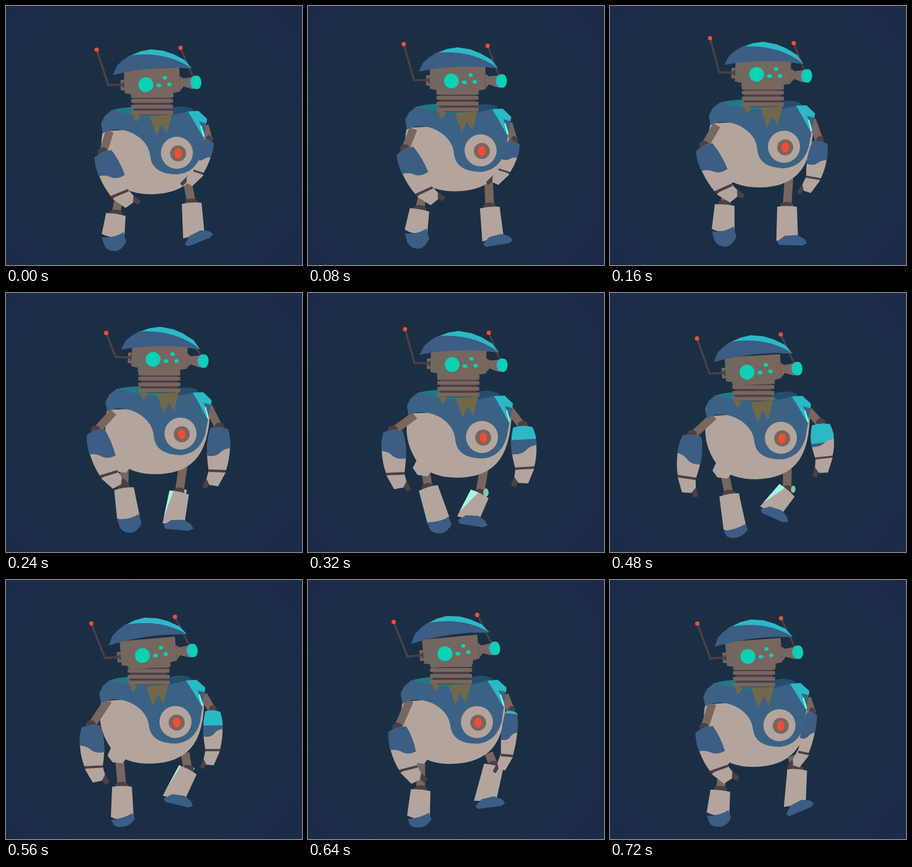
Write an HTML page with a canvas that moves like this. It is 480x420 px and loops after 0.8 s.

```html
<!DOCTYPE html>
<html lang="en">
<head>
<meta charset="utf-8">
<title>Walking robot</title>
<style>
html, body { margin: 0; width: 480px; height: 420px; overflow: hidden; background: #1b2e44; }
canvas { display: block; }
</style>
</head>
<body>
<canvas id="stage" width="480" height="420"></canvas>
<script>
const ctx = document.getElementById('stage').getContext('2d');
const STEPS = 10, STEP_MS = 80, DEG = Math.PI / 180;
const CREAM = '#b3a59d', BROWN = '#78665f', DARK = '#4b4045', BLUE = '#3c5d84', CHEST = '#3b6284';
const CYAN = '#2bb9c6', EYE = '#0ad2b5', RED = '#f04e33', OLIVE = '#71684c', MINT = '#a5f5e6';
let step = 0;

// One swing per cycle, peaking at a step
const swing = peak => Math.cos((step - peak) * 2 * Math.PI / STEPS);
const push = peak => Math.max(0, swing(peak));

// A swing plus an optional bounce that comes twice per cycle
const wave = (mid, amp, peak, bounce = 0, bouncePeak = 0) =>
  mid + amp * swing(peak) + bounce * Math.cos((step - bouncePeak) * 4 * Math.PI / STEPS);

function fill(color, path) {
  ctx.fillStyle = color;
  ctx.fill(new Path2D(path));
}

const poly = (color, ...points) => fill(color, 'M' + points.join(' ') + 'Z');

function oval(color, x, y, rx, ry = rx) {
  ctx.fillStyle = color;
  ctx.beginPath();
  ctx.ellipse(x, y, rx, ry, 0, 0, Math.PI * 2);
  ctx.fill();
}

function line(color, width, ...points) {
  ctx.strokeStyle = color;
  ctx.lineWidth = width;
  ctx.lineJoin = 'round';
  ctx.stroke(new Path2D('M' + points.join(' ')));
}

function box(color, x, y, w, h) {
  ctx.fillStyle = color;
  ctx.fillRect(x, y, w, h);
}

function placed(x, y, angle, draw) {
  ctx.save();
  ctx.translate(x, y);
  ctx.rotate(angle);
  draw();
  ctx.restore();
}

// Local space runs from 0 to 100 down the limb.
function limb(from, to, width, draw) {
  const dx = to.x - from.x, dy = to.y - from.y;
  placed(from.x, from.y, Math.atan2(dy, dx) - Math.PI / 2, () => {
    ctx.scale(width, Math.hypot(dx, dy) / 100);
    draw();
  });
}

function drawBackground() {
  const glow = ctx.createRadialGradient(225, 205, 40, 225, 205, 320);
  glow.addColorStop(0, '#1b3043');
  glow.addColorStop(.5, '#1b2e45');
  glow.addColorStop(1, '#1c2a4b');
  box(glow, 0, 0, 480, 420);
}

function drawThigh(hipX, hipY, knee) {
  line(BROWN, 14, hipX, hipY, knee.x, knee.y);
  oval(DARK, knee.x, knee.y - 1, 11, 7);
}

function drawLeftLeg(body) {
  const knee = { x: wave(187, 9, 4.7), y: wave(329, 13, 8.7) };
  const ankle = { x: wave(189.5, 20, 4.7, 4, 4.5), y: wave(373.5, 11, 7.3) };
  const toe = { x: ankle.x + 4, y: ankle.y + wave(20, 6, 1.5) };
  drawThigh(186 + body.x, 296 + body.y, knee);
  limb(knee, ankle, 1, () => fill(CREAM, 'M-16 0Q0-5 16 0L19 100Q0 118-18 100Z'));
  limb(ankle, toe, 1, () => fill(BLUE, 'M-18 0Q4 20 18-10L20 55Q12 105 2 108Q-12 104-16 60Z'));
}

function drawRightLeg(body) {
  const knee = { x: wave(291, 12.5, 9), y: wave(318.6, 11, 3, 6, .5) };
  const ankle = { x: wave(279, 25, 0), y: wave(365.4, 12, 1.6) };
  const rim = push(4.8);
  drawThigh((288 + body.x + knee.x) / 2, 288 + body.y, knee);
  oval('#7accaa', knee.x + 10, knee.y - 2, 5 * rim, 8 * rim);
  limb(knee, ankle, 1, () => {
    fill(CREAM, 'M-16 0Q0-5 16 0L18 94-17 108Z');
    poly(MINT, -16, 0, -16 + 15 * rim, -2, -17, 90);
  });
  placed(ankle.x + 8, ankle.y + 5, wave(1, 20, 5, 8, 1.5) * DEG, () =>
    poly(BLUE, -24, 1, -12, -9, 8, -11, 20, -5, 25, 2, 18, 6, -20, 6));
}

// Hands follow the forearm and curl a little further inwards.
function drawArm(shoulderX, shoulderY, elbow, wrist, side, width = 1, lit = 0) {
  const lean = Math.atan2(wrist.x - elbow.x, wrist.y - elbow.y);
  const curl = 1.3 * lean + side * 15 * DEG;
  const tip = { x: wrist.x + 27 * Math.sin(curl), y: wrist.y + 27 * Math.cos(curl) };
  line(BROWN, 13, shoulderX, shoulderY, elbow.x, elbow.y);
  oval(DARK, elbow.x, elbow.y - 3, 8 * width, 7);
  limb(wrist, tip, side * Math.max(width, .7), () => {
    poly(DARK, 4, 60, 14, 55, 17, 125, 9, 130);
    poly(CREAM, -14, 0, 15, 0, 14, 70, 6, 100, -9, 92);
  });
  limb(elbow, wrist, side * width, () => {
    fill(CREAM, 'M-15 2Q0-6 15 0Q24 40 16 100L-14 100Q-24 50-15 2Z');
    box(DARK, -14, 99, 30, 6);
    const sleeve = 'M-15 2Q0-6 15 0Q21 30 20 66Q4 70-4 56Q-10 48-20 46Q-20 20-15 2Z';
    fill(BLUE, sleeve);
    ctx.clip(new Path2D(sleeve));
    if (lit) box(CYAN, -25, -10, 50, 10 + 58 * lit);
  });
}

function drawArms(body) {
  drawArm(322 + body.x, 194 + body.y,
    { x: wave(338, 10.5, 4.1), y: wave(217, 4.2, 1.6) },
    { x: wave(333.4, 21, 4.7), y: wave(275.6, 2, 3, 10, 3.2) },
    -1, wave(.8, .25, 4.5), push(5.6));
  drawArm(168 + body.x, 203 + body.y,
    { x: wave(145, 12.6, .5), y: wave(233, 9, 8.7) },
    { x: wave(158.3, 32.6, .6, 5.6, 2.7), y: wave(298.6, 7, 8.7) },
    1);
}

function drawBelly() {
  oval('#207985', 226, 171, 55, 8);
  oval('#254d6c', 284, 170, 20, 7);
  fill(CREAM, 'M157 203C150 235 158 262 177 286Q200 306 238 305Q280 304 301 281Q325 255 324 192Z');
  poly(CREAM, 172, 278, 166, 291, 174, 302, 190, 304, 200, 292);
}

function drawChest() {
  fill(CHEST, 'M172 168L160 178 154 190 157 206Q178 194 205 206Q232 220 234 245Q238 273 278 273Q308 270 317 238L325 190 326 183 312 171 296 171Q235 188 172 168Z');
  poly(CYAN, 295, 171, 312, 170, 326, 183, 325, 190, 313, 187, 322, 207, 321, 215, 306, 189);
  line(MINT, 2, 316, 194, 321, 212);
  oval(CREAM, 277, 238, 26);
  oval('#7b645e', 279, 239, 13);
  oval(RED, 279, 239, 6, 8);
}

function drawNeck() {
  box(DARK, 208, 144, 60, 32);
  box(BROWN, 204, 140, 68, 8);
  for (let y = 150; y < 175; y += 9.5) box(BROWN, 204, y, 68, 6);
}

function drawSpikes() {
  poly(OLIVE, 205, 172, 212, 188, 220, 177);
  poly(OLIVE, 234, 178, 245, 210, 253, 191, 262, 206, 270, 175);
}

function drawAntennaTip(x, y) {
  oval(RED, x, y, 3.5);
}

function drawHead() {
  const dip = 4 + 20 * push(3) ** 8;
  const skin = ctx.createLinearGradient(-35, 10, 55, -10);
  skin.addColorStop(0, '#706860');
  skin.addColorStop(1, '#7a655f');

  line(DARK, 3, 58, -63 + dip * 1.3, 76, -12);
  drawAntennaTip(58, -63 + dip * 1.3);
  box(BROWN, -41, -9, 8, 17);
  poly(skin, -35, -26, 55, -26, 55, 13, 44, 15, 44, 21, -24, 21, -24, 15, -35, 13);
  poly(BROWN, 55, -12, 61, -8, 76, -10, 76, 10, 61, 5, 55, 12);
  box(DARK, -38, -5, 3, 9);
  oval(CYAN, 80, -1, 8, 11);
  oval(EYE, 83, -1, 7, 11);
  oval(EYE, 0, 0, 12);
  oval(EYE, 31, -10, 3.5, 3);
  oval(EYE, 21, 2, 4, 3);
  oval(EYE, 38, 1, 3.5, 3);

  placed(0, wave(0, 4, 2.5), 0, () => {
    fill(CYAN, 'M-28-46L-8-54 9-57 30-54 46-48 64-38 75-24 50-26Z');
    fill(BLUE, 'M-53-17L-46-32-37-40-25-48Q34-54 75-24Q10-31-53-17Z');
  });
  line(DARK, 3.5, -78, -63 + dip, -61, -1, -36, -1);
  drawAntennaTip(-78, -63 + dip);
}

function drawRobot() {
  const body = { x: wave(1.5, 4.5, 3), y: wave(-5, 1.2, 8, 4.7, 0) };
  const head = { x: wave(228.6, 8.7, 2.5, 1.8, 2.8), y: wave(120.4, 6.2, 7.6, 7.1, .3) };
  const onBody = draw => placed(279 + body.x, 239 + body.y, wave(.3, 1.3, 3) * DEG, () => {
    ctx.translate(-279, -239);
    draw();
  });
  const onNeck = draw => placed(head.x - 228, (head.y - 126 + body.y) / 2, 0, draw);

  drawRightLeg(body);
  drawLeftLeg(body);
  onBody(drawBelly);
  drawArms(body);
  onNeck(drawNeck);
  onBody(drawChest);
  onNeck(drawSpikes);
  placed(head.x, head.y, wave(-1.3, 4.1, 2.7) * DEG, drawHead);
}

function frame() {
  step = Math.floor(performance.now() / STEP_MS) % STEPS;
  drawBackground();
  drawRobot();
  requestAnimationFrame(frame);
}
frame();
</script>
</body>
</html>
```
